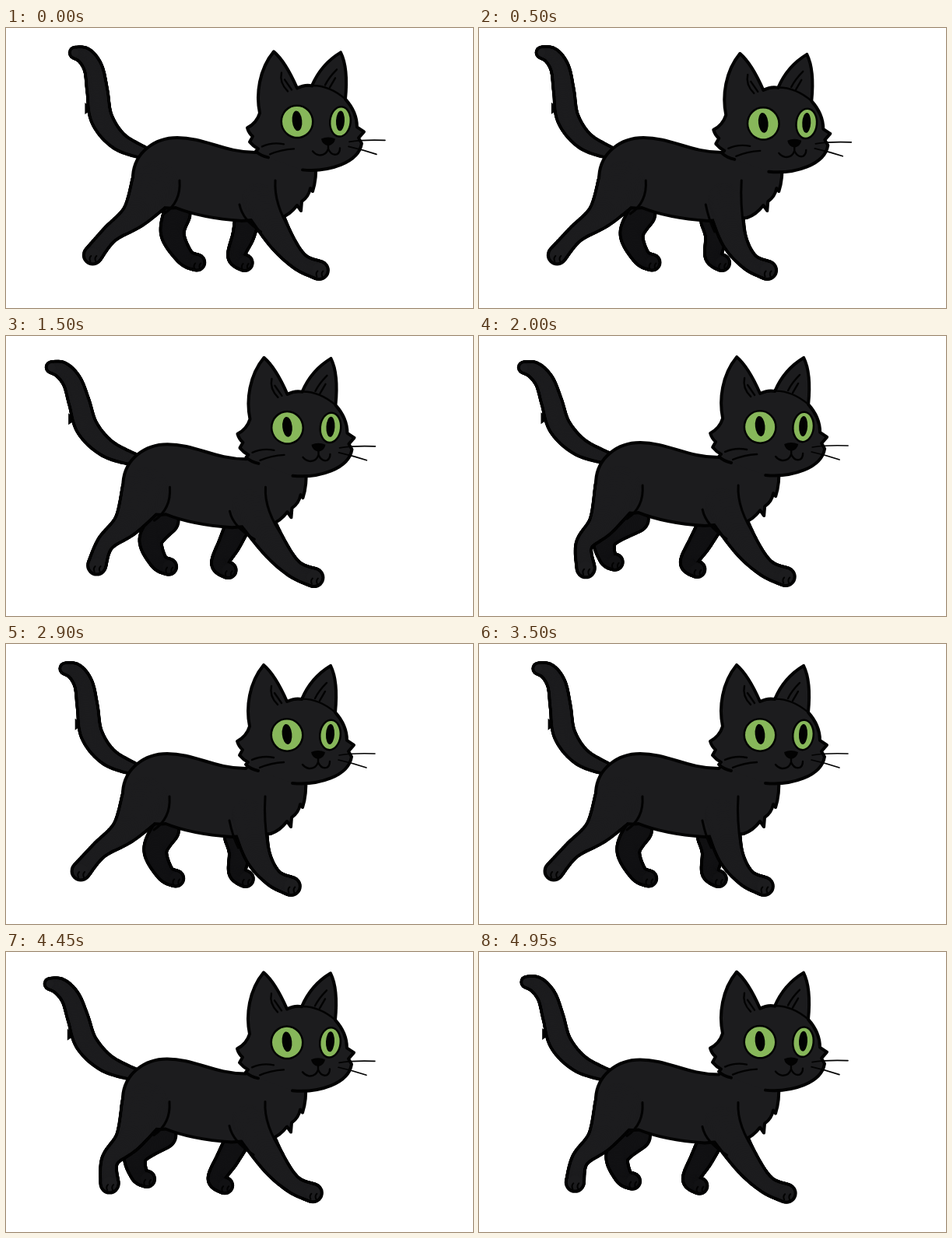
An HTML page with a canvas for the animation above (5000 ms loop, 600 px wide and 360 px high).

```html
<!DOCTYPE html>
<html lang="en">
<head>
<meta charset="utf-8">
<title>Walking cat</title>
<style>
html, body { margin: 0; width: 100%; height: 100%; overflow: hidden; background: #fff; }
canvas { display: block; width: 600px; height: 360px; }
</style>
</head>
<body>
<canvas id="stage" width="600" height="360"></canvas>
<script>
const ctx = document.getElementById('stage').getContext('2d');
const LOOP = 5000, STEP = 50, STRIDE = 600;
const INK = '#020202', FUR = '#1c1c1e', SHADE = '#111113', GREEN = '#87b75a';

// Joints are x, y, radius at rest. Two pulses per stride move the paw sideways
// by reach and push; push also moves it by lift. Give is each joint's share.
const LEGS = {
  farHind: {
    joints: [[207, 239, 19], [204, 265, 16.5], [221, 294, 12.5], [237, 301.5, 12]],
    give: [0.1, 0.65, 0.9, 1], reach: -19, push: -64, lift: -11
  },
  farFront: {
    joints: [[296, 248, 17], [289, 267, 15.5], [278, 293, 12.5], [289, 302, 12]],
    give: [0, 0.6, 1, 1], reach: 19, push: -9, lift: -2
  },
  nearHind: {
    joints: [[180, 200, 33], [154, 239, 19], [121, 265, 12.5], [99, 292, 13.5]],
    give: [0, 0.13, 0.37, 1], reach: -3, push: 39, lift: 7
  },
  nearFront: {
    joints: [[311, 220, 25], [344, 270, 18], [371, 300, 13], [397, 311.5, 13.5]],
    give: [0, 0.7, 0.92, 1], reach: -31, push: -3, lift: -2
  }
};
const TAIL = [[168, 162, 9], [131, 146, 13], [107, 118, 15.5], [99, 84, 15], [92, 56, 13.5], [80, 40, 12], [67, 36, 9]];

const BODY = new Path2D('M150 190C152 160 178 141 207 141C242 141 268 160 308 160L330 140L380 150L385 170C386 186 385 198 381 210L378 206Q376 217 367 223L366 235L361 228Q352 240 340 244L290 248C262 246 232 242 205 231C175 235 148 215 150 190Z');
const HEAD = new Path2D('M368 177C402 180 440 168 444 143L440 136L447 128L438 122C438 108 432 96 423 86C425 66 425 42 417 26C402 35 388 50 380 69Q371 67 361 72C354 56 344 36 331 25C312 48 308 80 313 104Q309 117 297 123Q299 130 304 134L300 141Q305 147 311 150L308 153Q314 159 324 161');
const FACE = new Path2D('M361 72Q394 61 423 86M341 52Q338 65 349 76M345 61L354 74M412 48Q402 58 397 68M410 59L403 71M401 144L401 150Q398 159 389 158Q384 157 381 153M401 150Q405 159 412 157Q416 155 416 149M344 144Q329 141 316 147M357 150Q340 151 326 157');
const WHISKERS = new Path2D('M428 141Q445 138 474 139M427 147Q445 151 463 157');
const NOSE = new Path2D('M392 137Q401 133 410 137Q409 144 401 146Q393 144 392 137Z');

const wave = (phase, peak, period) => Math.cos((phase - peak) / period * 2 * Math.PI);
const pulse = (phase, peak) => ((1 + wave(phase, peak, STRIDE)) / 2) ** 4;

function spline(a, b, c, d, t) {
  return b + t * (c - a + t * (2 * a - 5 * b + 4 * c - d + t * (3 * (b - c) + d - a))) / 2;
}

function poseLeg({ joints, give, reach, push, lift }, phase, dy) {
  const a = pulse(phase, 490), b = pulse(phase, 215);
  return joints.map(([x, y, r], i) => [
    x + give[i] * (reach * a + push * b),
    y + (i ? give[i] * lift * b : dy),
    r
  ]);
}

// A limb is a run of discs along its joints
function limb(joints, inset, color) {
  const last = joints.length - 1, steps = 20;
  const at = i => joints[Math.max(0, Math.min(last, i))];
  ctx.fillStyle = color;
  for (let s = 0; s <= last * steps; s++) {
    const i = Math.min(last - 1, Math.floor(s / steps)), t = s / steps - i;
    const [x, y, r] = [0, 1, 2].map(n => spline(at(i - 1)[n], at(i)[n], at(i + 1)[n], at(i + 2)[n], t));
    ctx.beginPath();
    ctx.arc(x, y, r - inset, 0, 7);
    ctx.fill();
  }
}

function pen(width) {
  ctx.strokeStyle = INK;
  ctx.lineWidth = width;
  ctx.lineCap = ctx.lineJoin = 'round';
}

function curve(x, y, cx, cy, ex, ey) {
  ctx.beginPath();
  ctx.moveTo(x, y);
  ctx.quadraticCurveTo(cx, cy, ex, ey);
  ctx.stroke();
}

function toes(joints) {
  const [x, y] = joints[3];
  pen(2);
  for (const side of [-3, 4]) curve(x + side, y + 8, x + side - 2, y + 4, x + side + 1, y + 1);
}

function farLeg(joints) {
  limb(joints, 0, INK);
  limb(joints, 4, SHADE);
  toes(joints);
}

function tail(phase, dy) {
  const swing = wave(phase, 545, STRIDE);
  const bend = ([x, y, r]) => {
    const w = Math.max(0, (160 - y) / 125);
    return [x + 10.5 * swing * w, y - 5 * swing * w + dy * (1 - w), r];
  };
  const spine = TAIL.map(bend);
  const [x, y] = bend([84, 98]);
  ctx.fillStyle = INK;
  ctx.beginPath();
  ctx.moveTo(x, y);
  ctx.lineTo(x, y + 15);
  ctx.lineTo(x + 10, y + 8);
  ctx.fill();
  limb(spine, 0, INK);
  limb(spine, 4, FUR);
}

function oval(x, y, rx, ry, tilt, color) {
  ctx.beginPath();
  ctx.ellipse(x, y, rx, ry, tilt, 0, 7);
  ctx.fillStyle = color;
  ctx.fill();
}

function eye(x, y, rx, ry, tilt, pupil) {
  oval(x, y, rx + 1.5, ry + 1.5, tilt, INK);
  oval(x, y, rx - 1, ry - 1, tilt, GREEN);
  oval(x, y - 1, pupil, 13, tilt / 2, INK);
}

function head(dy) {
  ctx.save();
  ctx.translate(0, dy);
  ctx.fillStyle = FUR;
  ctx.fill(HEAD);
  pen(4);
  ctx.stroke(HEAD);
  pen(2.4);
  ctx.stroke(FACE);
  eye(361, 115, 20, 20.5, -0.2, 6.3);
  eye(416.5, 115, 13, 19, 0.1, 5.5);
  ctx.fillStyle = INK;
  ctx.fill(NOSE);
  pen(1.6);
  ctx.stroke(WHISKERS);
  ctx.restore();
}

function torso(hind, front, dy) {
  limb(hind, 0, INK);
  limb(front, 0, INK);
  ctx.save();
  ctx.translate(0, dy);
  ctx.fillStyle = FUR;
  ctx.fill(BODY);
  pen(4);
  ctx.stroke(BODY);
  ctx.restore();
  limb(hind, 4, FUR);
  limb(front, 4, FUR);
  toes(hind);
  toes(front);

  pen(3);
  curve(210, 196 + dy, 212, 224 + dy, 190, 239 + dy);
  const [kx, ky] = front[1];
  curve(333, 196 + dy, 331, 226 + dy, kx + 14, ky - 9);
  curve(287, 227 + dy, 291, 247 + dy, kx - 24, ky - 8);
}

function draw(time) {
  const t = Math.floor(time % LOOP / STEP) * STEP;
  const phase = t % STRIDE;
  const dy = -4 * pulse(phase, 215);
  const settle = 6 * Math.max(0, 1 - (t / 2000) ** 3);
  const bob = 2 * wave(phase, 210, STRIDE / 2);
  const leg = name => poseLeg(LEGS[name], phase, dy);

  ctx.fillStyle = '#fff';
  ctx.fillRect(0, 0, 600, 360);
  ctx.save();
  ctx.translate(13 * Math.exp(-t / 450), 0);
  farLeg(leg('farHind'));
  farLeg(leg('farFront'));
  tail(phase, dy);
  torso(leg('nearHind'), leg('nearFront'), dy);
  head(bob + settle);
  ctx.restore();
}

const start = performance.now();
function tick() {
  draw(performance.now() - start);
  requestAnimationFrame(tick);
}
tick();
</script>
</body>
</html>
```
